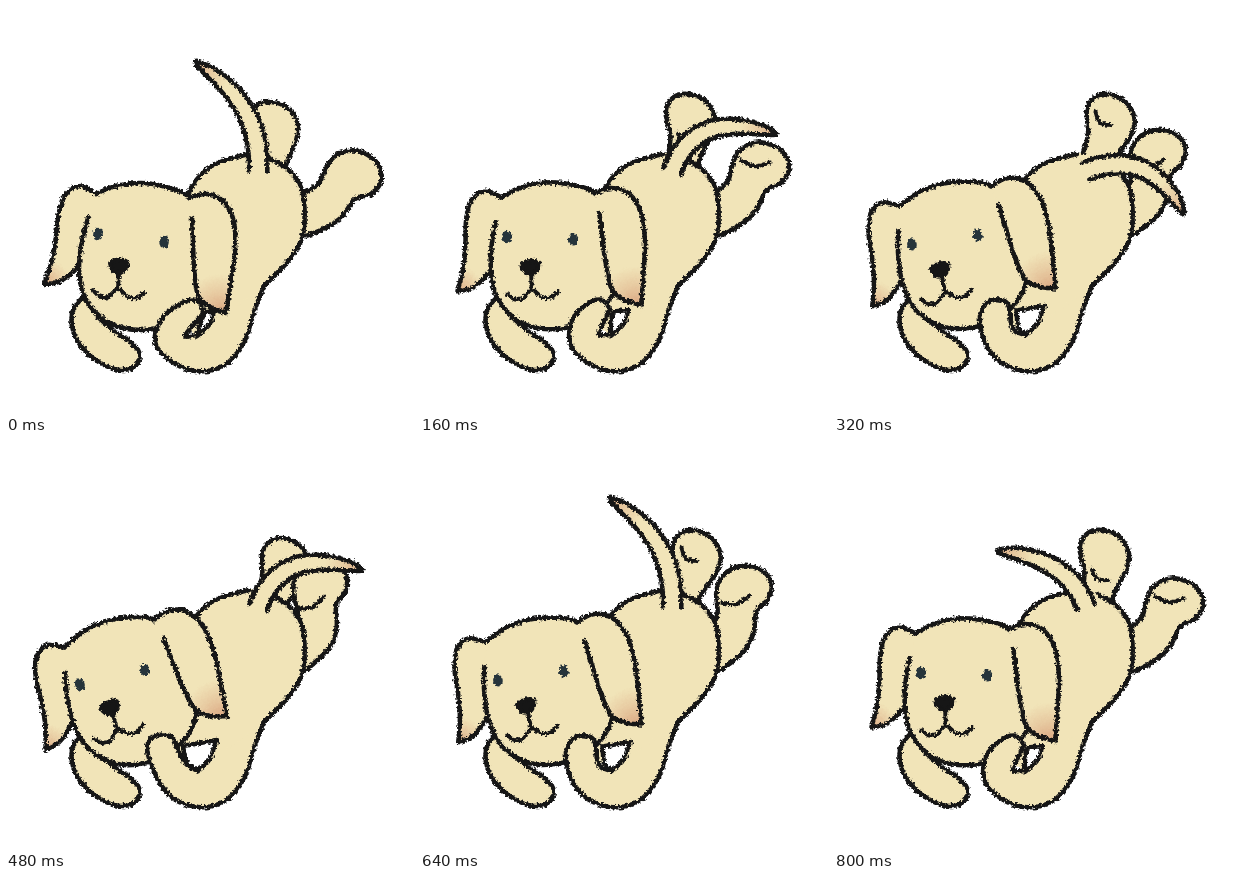
These frames come from a looping animation (408x408 px, 0.96 s). An HTML page:

```html
<!DOCTYPE html>
<html lang="en">
<head>
<meta charset="utf-8">
<title>Puppy</title>
<style>
  html, body { margin: 0; width: 100%; height: 100%; overflow: hidden; background: #fff; }
  svg { display: block; width: 100%; height: 100%; }
  .pose { visibility: hidden; animation: show 960ms step-end infinite; }
  path { stroke: #161616; stroke-width: 4.6; stroke-linecap: round; stroke-linejoin: round; }
  .bare { stroke: none; }
  .thin { stroke-width: 4; }
  @keyframes show {
    0% { visibility: visible; }
    16.6666%, 100% { visibility: hidden; }
  }
</style>
</head>
<body>
<svg id="stage" viewBox="0 0 408 408">
  <defs id="defs">
    <filter id="rough" filterUnits="userSpaceOnUse" x="0" y="0" width="408" height="408" color-interpolation-filters="sRGB">
      <feTurbulence type="fractalNoise" baseFrequency=".4" numOctaves="2" seed="4"/>
      <feDisplacementMap in="SourceGraphic" scale="5.5" xChannelSelector="R" yChannelSelector="G"/>
      <feGaussianBlur stdDeviation=".45"/>
    </filter>
  </defs>
</svg>
<script>
const FUR = '#f1e4b8', TIP = '#d9a37e', FRAMES = 6, STEP = 160;
const stage = document.getElementById('stage');
const defs = document.getElementById('defs');

// Smooth curve through "x,y" points; "/" marks a corner at the point before it.
function curve(text) {
  let d = '', last;
  for (const part of text.split('/')) {
    const pts = part.trim().split(/\s+/).map(p => p.split(',').map(Number));
    if (last) pts.unshift(last);
    else d = `M${pts[0]}`;
    for (let i = 0; i < pts.length - 1; i++) {
      const a = pts[i - 1] || pts[i], b = pts[i], c = pts[i + 1], e = pts[i + 2] || c;
      const h1 = b.map((v, n) => v + (c[n] - a[n]) / 6);
      const h2 = c.map((v, n) => v - (e[n] - b[n]) / 6);
      d += `C${h1} ${h2} ${c}`;
    }
    last = pts[pts.length - 1];
  }
  return d;
}

const shape = (pts, fill = FUR, cls = '') => `<path class="${cls}" d="${curve(pts)}" fill="${fill}"/>`;
const line = (pts, cls) => shape(pts, 'none', cls);

// Blend two point strings of the same form.
function mix(from, to, k) {
  const ends = to.match(/\d+/g);
  return from.replace(/\d+/g, n => +n + (ends.shift() - n) * k);
}

// Turn points about a joint, then shift them down.
function turn(text, [cx, cy], degrees, dy = 0) {
  const c = Math.cos(degrees * Math.PI / 180), s = Math.sin(degrees * Math.PI / 180);
  return text.replace(/(\S+),(\S+)/g, (_, x, y) =>
    `${cx + (x - cx) * c - (y - cy) * s},${cy + (x - cx) * s + (y - cy) * c + dy}`);
}

function addTint(id, x, y, r) {
  defs.insertAdjacentHTML('beforeend',
    `<radialGradient id="${id}" gradientUnits="userSpaceOnUse" cx="${x}" cy="${y}" r="${r}">
      <stop stop-color="${TIP}" stop-opacity=".9"/>
      <stop offset=".5" stop-color="${TIP}" stop-opacity=".4"/>
      <stop offset="1" stop-color="${TIP}" stop-opacity="0"/></radialGradient>`);
}
const tipped = (pts, id) => shape(pts, FUR, 'bare') + shape(pts, `url(#${id})`);

addTint('leftTip', 39, 279, 26);
addTint('rightTip', 214, 306, 38);

function hindLegs(k) {
  const hip = [268, 155], lean = 16 * k - 3, drop = 8 - 11 * Math.sin(Math.PI * k);
  const nearHip = [295, 205], swing = 10 - 38 * k;
  const far = turn('248,150 250,130 245,106 253,91 269,88 285,95 294,110 292,127 283,145 278,158', hip, lean, drop);
  const farToes = turn('257,127 263,137 274,138', hip, lean, 10 - 40 * k);
  const near = turn('296,186 308,174 313,155 322,142 340,136 360,143 369,160 361,176 346,184 336,204 320,219', nearHip, swing);
  const nearToes = turn('321,148 335,154 350,150', nearHip, swing, 24 * k);
  return shape(far) + (k > 0 && k < 1 ? line(farToes, 'thin') : '') +
    shape(near + ' 297,231') + (k > 0 ? line(nearToes, 'thin') : '');
}

function body() {
  const back = '181,190 192,172 211,157 243,148';
  const rump = '264,152 285,166 297,188 297,228 283,254 258,280';
  return shape(`${back} ${rump} / 246,310 / 200,340 / 170,310`, FUR, 'bare') + line(back) + line(rump);
}

// A tapering quadratic curve from the rump to the tip.
function tail([bendX, bendY, tipX, tipY], id) {
  const left = [], right = [], count = 10;
  for (let i = 0; i <= count; i++) {
    const t = i / count, u = 1 - t;
    const x = u * u * 252 + 2 * u * t * bendX + t * t * tipX;
    const y = u * u * 165 + 2 * u * t * bendY + t * t * tipY;
    const dx = u * (bendX - 252) + t * (tipX - bendX);
    const dy = u * (bendY - 165) + t * (tipY - bendY);
    const w = 9.3 * Math.sqrt(1 - t ** 3) / Math.hypot(dx, dy);
    left.push(`${x + dy * w},${y - dx * w}`);
    if (i < count) right.unshift(`${x - dy * w},${y + dx * w}`);
  }
  addTint(id, tipX, tipY, 38);
  return tipped([...left, ...right].join(' '), id);
}

function head() {
  const eye = (x, y) => `<ellipse cx="${x}" cy="${y}" rx="4.8" ry="6.2" fill="#26343b"/>`;
  return tipped('90,188 74,180 60,188 53,206 50,231 46,254 38,278 / 52,276 66,267 74,258', 'leftTip') +
    shape('90,188 110,180 135,177 160,181 183,191 202,220 204,265 192,295 175,313 155,321 135,324 110,320 90,307 77,287 73,262 76,235 82,212') +
    eye(92, 228) + eye(158, 236) +
    '<path class="thin" fill="#161616" d="M104 257q4 -4 9 -3q6 -1 9 3q0 6 -9 11q-9 -4 -9 -11z"/>' +
    line('113,266 112,283', 'thin') + line('87,284 93,290 102,291 112,283 122,291 130,292 138,287', 'thin');
}

const rightEar = () =>
  tipped('183,192 200,188 217,195 228,216 229,245 225,275 220,307 / 204,301 192,289 188,262 187,235 186,212', 'rightTip');

function arm(k) {
  const paw = mix('150,339 155,314 174,298 191,294 197,306 188,318 179,330 190,329',
                  '155,343 143,317 142,301 152,293 166,295 172,308 180,322 192,329', k);
  const gap = mix('199,306 / 208,306 / 203,319 191,330 / 194,318 199,306',
                  '177,304 / 211,298 / 203,318 192,328 / 181,321 177,304', k);
  return shape(`258,280 249,303 240,332 224,355 201,365 173,360 ${paw}`) + shape(gap, '#fff');
}

function puppy(i, bend) {
  const k = (1 - Math.cos(2 * Math.PI * i / FRAMES)) / 2;
  const tilt = art => `<g transform="rotate(${-19.5 * k} 125 288)">${art}</g>`;
  return hindLegs(k) + body() + tail(bend, `tail${i}`) +
    shape('78,290 67,304 67,324 79,345 100,360 118,364 131,358 133,346 122,334 108,325 92,311') +
    tilt(head()) + arm(k) + tilt(rightEar());
}

// Bend point and tip of each tail position.
const up = [256, 96, 189, 56], right = [275, 102, 357, 128];
const down = [315, 140, 350, 208], left = [234, 115, 163, 109];

stage.insertAdjacentHTML('beforeend', [up, right, down, right, up, left].map((bend, i) =>
  `<g class="pose" filter="url(#rough)" style="animation-delay:${i && (i - FRAMES) * STEP}ms">${puppy(i, bend)}</g>`
).join(''));
</script>
</body>
</html>
```
